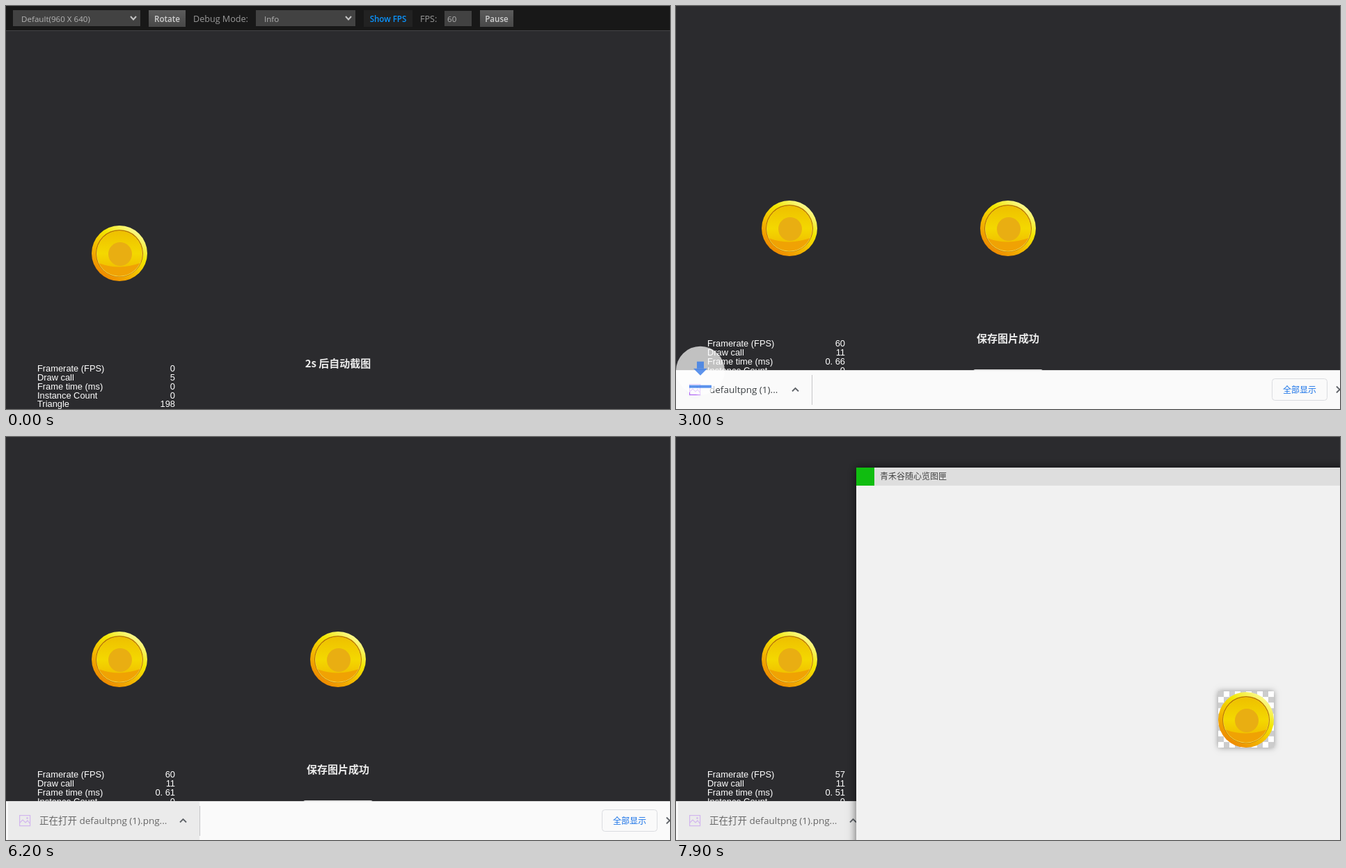
Write an HTML page with a canvas that moves like this. It is 954 px wide and 580 px high and loops after 8000 ms.

```html
<!DOCTYPE html>
<html lang="zh">
<head>
<meta charset="utf-8">
<style>
html, body { margin: 0; width: 954px; height: 580px; overflow: hidden; background: #2b2b2e; }
canvas { display: block; }
</style>
</head>
<body>
<canvas id="stage" width="954" height="580"></canvas>
<script>
const c = document.getElementById('stage').getContext('2d');
const W = 954, H = 580, LOOP = 8000, STEP = 100;
const CJK = '"Noto Sans CJK SC", "Noto Sans CJK", sans-serif';
const UI = '"Open Sans", ' + CJK;
const ARIAL = '"Liberation Sans", Arial, sans-serif';

// start, FPS, draw calls, frame time, triangles
const STATS = [
  [0, 0, 5, '0', 198],
  [200, 59, 5, '0. 48', 198],
  [700, 60, 5, '0. 55', 198],
  [1200, 60, 5, '0. 53', 198],
  [1600, 57, 11, '1. 04', 226],
  [2100, 58, 11, '0. 71', 226],
  [2600, 60, 11, '0. 66', 226],
  [3100, 60, 11, '0. 61', 226],
  [3600, 59, 11, '0. 64', 226],
  [4200, 60, 11, '0. 60', 226],
  [4700, 60, 11, '0. 57', 226],
  [5300, 60, 11, '0. 67', 226],
  [5800, 60, 11, '0. 53', 226],
  [6200, 60, 11, '0. 61', 226],
  [6700, 60, 11, '0. 48', 226],
  [7100, 60, 11, '0. 58', 226],
  [7600, 57, 11, '0. 51', 226]
];

const clamp = v => Math.max(0, Math.min(1, v));

function rect(x, y, w, h, fill) {
  c.fillStyle = fill;
  c.fillRect(x, y, w, h);
}

function box(x, y, w, h, r, fill, line) {
  c.beginPath();
  c.roundRect(x, y, w, h, r);
  c.fillStyle = fill;
  c.fill();
  if (line) { c.strokeStyle = line; c.lineWidth = 1; c.stroke(); }
}

function disc(x, y, r, fill) {
  c.beginPath();
  c.arc(x, y, r, 0, Math.PI * 2);
  c.fillStyle = fill;
  c.fill();
}

function poly(points, color, width) {
  c.beginPath();
  points.forEach(([x, y]) => c.lineTo(x, y));
  c.strokeStyle = color;
  c.lineWidth = width;
  c.stroke();
}

function text(s, x, y, font, fill, align = 'left') {
  c.font = font;
  c.textAlign = align;
  c.fillStyle = fill;
  c.fillText(s, x, y);
}

function gradient(x0, y0, x1, y1, ...colors) {
  const g = c.createLinearGradient(x0, y0, x1, y1);
  colors.forEach((color, i) => g.addColorStop(i / (colors.length - 1), color));
  return g;
}

function coin(x, y) {
  c.save();
  c.translate(x, y);
  disc(0, 0, 40, gradient(-24, 32, 24, -32, '#ee8a00', '#f3b800', '#f2e600', '#fbf98a'));
  disc(0, 0, 34, '#b87400');
  disc(0, 0.6, 33, '#f6d24a');
  disc(0, 0, 32.5, gradient(0, -32, 0, 32, '#eec000', '#f4d800', '#efb400'));
  c.beginPath();
  c.arc(0, 0, 32.5, 0.45, Math.PI - 0.45);
  c.quadraticCurveTo(0, 25, 29.3, 14.1);
  c.fillStyle = '#f0a204';
  c.fill();
  disc(1, 1, 17, '#e9ae12');
  c.restore();
}

function toolbar() {
  const label = '12.6px ' + UI, field = '11.6px ' + UI, bold = '600 11.6px ' + UI;
  const select = (x, w, s) => {
    rect(x, 6, w, 23, '#424242');
    text(s, x + 12, 23, field, '#b4b4b4');
    const a = x + w - 10;
    poly([[a - 4, 15], [a, 19.5], [a + 4, 15]], '#c4c4c4', 2);
  };
  const button = (x, w, s) => {
    rect(x, 6, w, 24, gradient(0, 6, 0, 30, '#5c5c5c', '#484848'));
    text(s, x + w / 2, 23, bold, '#d0d0d0', 'center');
  };
  rect(0, 0, W, 35, '#181818');
  rect(0, 35, W, 1, '#454547');
  select(10, 183, 'Default(960 X 640)');
  button(205, 53, 'Rotate');
  text('Debug Mode:', 269, 23, label, '#999');
  select(359, 143, 'Info');
  rect(514, 6, 70, 24, '#222');
  text('Show FPS', 549, 23, bold, '#0a94ff', 'center');
  text('FPS:', 595, 23, label, '#999');
  rect(630, 7, 39, 22, '#424242');
  text('60', 634, 23, field, '#b4b4b4');
  button(681, 48, 'Pause');
}

function stats(t, y) {
  const [, fps, calls, ms, tris] = STATS.findLast(s => s[0] <= t);
  const rows = [
    ['Framerate (FPS)', fps], ['Draw call', calls], ['Frame time (ms)', ms],
    ['Instance Count', 0], ['Triangle', tris], ['Game Logic (ms)', '0. 02'],
    ['Physics (ms)', 0], ['Renderer (ms)', '0. 68']
  ];
  const font = '12.85px ' + ARIAL;
  rows.forEach(([name, value], i) => {
    const row = y + 526 + i * 12.85;
    text(name, 45, row, font, '#fff');
    text(value, 243, row, font, '#fff', 'right');
  });
}

function scene(t) {
  const y = t < 2500 ? 0 : -36;
  rect(0, 0, W, H, '#2b2b2e');
  if (t < 2500) toolbar();
  coin(163, 356 + y);
  const note = t < 1500 ? '2s 后自动截图' : t < 2600 ? '截图成功' : '保存图片成功';
  text(note, 477, 519.5 + y, 'bold 15px ' + CJK, '#ececec', 'center');
  if (t >= 1500) {
    coin(477, 356 + y);
    const pressed = t >= 2500 && t < 2600;
    const fill = pressed ? '#4c4c4c' : gradient(0, 559 + y, 0, 599 + y, '#e2e2e2', '#cfcfcf');
    box(427, 559 + y, 100, 40, 3, fill);
    text('下载截图', 477, 587 + y, '20px ' + CJK, pressed ? '#000' : '#222', 'center');
  }
  stats(t, y);
}

function elide(s, width) {
  if (c.measureText(s).width <= width) return s;
  while (s && c.measureText(s + '...').width > width) s = s.slice(0, -1);
  return s && s + '...';
}

function fileIcon(color) {
  c.strokeStyle = color;
  c.lineWidth = 1.2;
  c.strokeRect(19.6, 544.6, 15, 15);
  poly([[20, 555], [24, 551], [28, 555], [31, 552], [34, 556]], color, 1.2);
  disc(30.5, 548.5, 1.3, color);
}

function shelf(t) {
  if (t < 2600) return;
  const opening = t >= 5800;
  const grow = clamp((t - 2530) / 800);
  const edge = opening ? 278 : 235 * (1 - (1 - grow) ** 2);

  c.save();
  c.translate(0, 56 * (1 - clamp((t - 2500) / 200)));
  rect(0, 524, W, 56, '#fafafa');
  rect(0, 524, W, 1, '#e4e4e4');
  if (t >= 5500) rect(3, 525, edge - 3, 55, t < 5600 ? '#f1f1f1' : '#ebebeb');

  fileIcon(opening ? '#d2b6ee' : '#b066f5');
  c.font = '13.5px ' + UI;
  const name = opening ? '正在打开 defaultpng (1).png...' : elide('defaultpng (1).png', edge - 95);
  text(name, 48, 557, c.font, opening ? '#666' : '#3c4043');
  if (edge > 60) poly([[edge - 28, 554.5], [edge - 23.5, 550], [edge - 19, 554.5]], '#5f6368', 1.8);
  rect(Math.round(edge), 531, 1, 43, '#c6c6c8');

  // completion ring pulses, then fades out
  const p = (t - 2450) / 2500;
  if (p < 1) {
    c.globalAlpha = 0.5 + 0.5 * Math.cos(p * Math.PI * 5);
    c.beginPath();
    c.arc(27, 552, 12, 0, Math.PI * 2);
    c.strokeStyle = '#4285f4';
    c.lineWidth = 1.8;
    c.stroke();
    c.globalAlpha = 1;
  }

  const hover = t >= 3200 && t < 5500;
  box(856.5, 536.5, 79, 31, 4, hover ? '#e9f2fd' : '#fafafa', hover ? '#cfe0f8' : '#dadce0');
  text('全部显示', 896, 556.5, '12px ' + CJK, '#1a73e8', 'center');
  poly([[949, 547.5], [958, 556.5]], '#5f6368', 1.8);
  poly([[949, 556.5], [958, 547.5]], '#5f6368', 1.8);
  c.restore();
}

function downloadArrow(t) {
  const v = (t - 2574) / 600;
  if (v <= 0 || v >= 1) return;
  c.save();
  c.globalAlpha = 1 - 4 * (v - 0.5) ** 2;
  c.translate(35, 545 - 70 * (1 - v));
  disc(0, 0, 35, 'rgba(255,255,255,.86)');
  rect(-5, -13, 10, 10, '#3b7de9');
  c.beginPath();
  c.moveTo(-10, -3);
  c.lineTo(10, -3);
  c.lineTo(0, 7);
  c.fill();
  rect(-16, 21, 32, 4, '#3b7de9');
  c.restore();
}

function viewer(t) {
  if (t < 7600) return;
  const x = 259, y = 44;
  c.save();
  c.beginPath();
  c.rect(0, 0, W, H);
  c.rect(x, y, W, H);
  c.clip('evenodd');
  c.shadowColor = t < 7700 ? 'rgba(0,0,0,.25)' : 'rgba(0,0,0,.6)';
  c.shadowBlur = 12;
  rect(x, y, W, H, '#000');
  c.restore();
  if (t < 7800) return;

  rect(x, y, W, H, '#f1f1f1');
  rect(x, y, W, 26, '#dedede');
  rect(x, y, 26, 26, '#10bd10');
  text('青禾谷随心览图匣', 293, 61, '12px ' + CJK, '#444');
  if (t < 7900) return;

  c.save();
  c.shadowColor = 'rgba(0,0,0,.4)';
  c.shadowBlur = 8;
  rect(779, 366, 80, 81, '#fff');
  c.restore();
  for (let i = 0; i < 10; i++)
    for (let j = i % 2; j < 10; j += 2) rect(779 + i * 8, 366 + j * 8.1, 8, 8.1, '#ccc');
  coin(819, 407);
}

function frame(now) {
  const t = Math.floor(now % LOOP / STEP) * STEP;
  scene(t);
  shelf(t);
  downloadArrow(t);
  viewer(t);
  requestAnimationFrame(frame);
}
frame(0);
</script>
</body>
</html>
```
